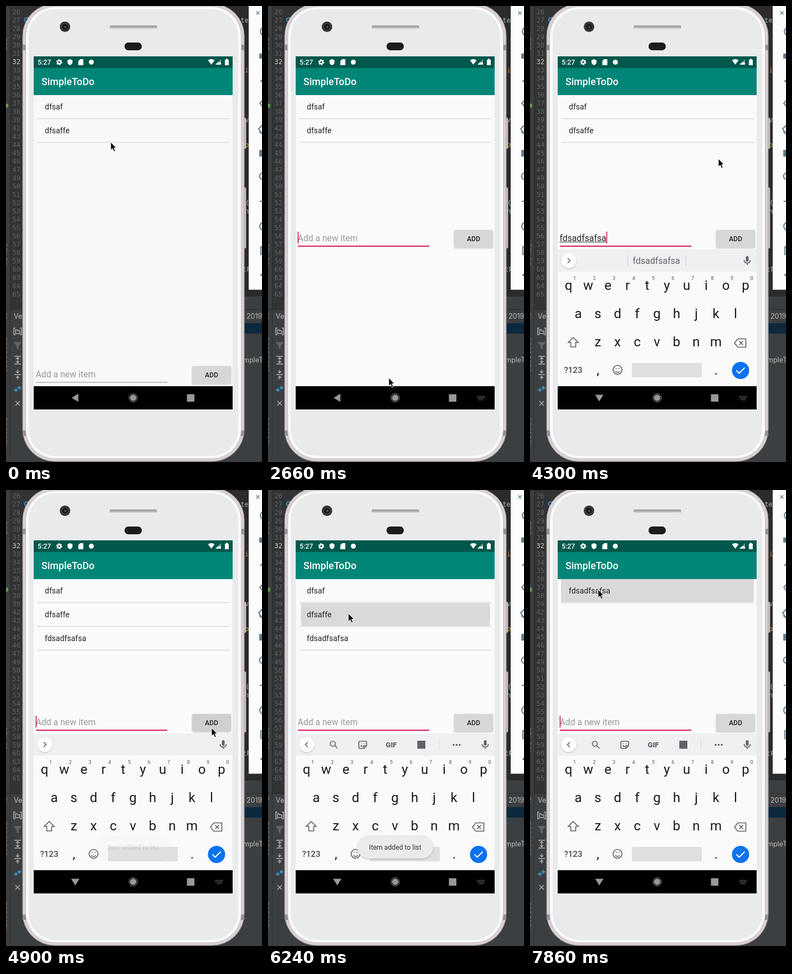
An HTML page for the animation above (8 s loop, 462 by 824 pixels).

```html
<!DOCTYPE html>
<html lang="en">
<head>
<meta charset="utf-8">
<title>To-do list demo</title>
<style>
html, body { margin: 0; width: 100%; height: 100%; overflow: hidden; background: #2b2b2b; }
svg { display: block; width: 462px; height: 824px; }
text { font-family: Roboto, sans-serif; white-space: pre; }
.ide text { font-family: Inter, sans-serif; font-size: 12.5px; fill: #bbb; }
.ide .mono { font-family: "DejaVu Sans Mono", monospace; font-size: 12px; fill: #a9b7c6; }
.ide .num { fill: #606366; text-anchor: end; }
.medium { font-weight: 500; }
.mid { text-anchor: middle; }
.item { font-size: 14px; fill: #222; }
.line { fill: none; stroke: #5f6368; stroke-width: 1.7; }
.key { font-size: 24px; fill: #17191c; text-anchor: middle; }
.hint { font-size: 9px; fill: #555; text-anchor: middle; }
.suggestion { font-size: 16px; fill: #5f6368; text-anchor: middle; }
</style>
</head>
<body>
<svg viewBox="0 0 462 824">
  <defs>
    <filter id="soft" x="-20%" y="-30%" width="140%" height="170%">
      <feDropShadow dx="0" dy="1" stdDeviation="1" flood-opacity=".28"/>
    </filter>
    <clipPath id="rowClip"><rect id="rowBox" x="56" y="161" width="348" height="42.5"/></clipPath>
  </defs>

  <g class="ide">
    <rect width="462" height="824" fill="#2b2b2b"/>
    <rect width="60" height="548" fill="#313335"/>
    <rect y="548" width="462" height="276" fill="#3c3f41"/>
    <rect x="425" y="525" width="37" height="23" fill="#3c3f41"/>
    <rect width="7" height="824" fill="#3c3f41"/>
    <path d="M7.5 0V824M0 548.5H40M425 548.5H462" stroke="#2b2b2b"/>
    <path d="M1 58v22M1 430v18M1 456v12M1 555v10M1 600v60M1 745v50" stroke="#8b8d8f" stroke-dasharray="5 3"/>
    <circle cx="0" cy="180" r="4" fill="#62a34a"/>
    <circle cx="37" cy="25" r="3.5" fill="none" stroke="#3592c4" stroke-width="2"/>
    <path d="M40 20v5" stroke="#db5860" stroke-width="2"/>
    <g id="numbers"></g>
    <text x="14" y="565">Ve</text>
    <g fill="none" stroke="#afb1b3" stroke-width="1.4">
      <path d="M17 582h-3v12h3M25 582h3v12h-3M17 592v-7h3l1 2h4v5z"/>
      <path d="M15 608h12l-5 6v6l-2-2v-4z" fill="#626567" stroke="#626567"/>
      <path d="M15 633h12M15 647h12M21 635v10M18 638l3-3 3 3M18 642l3 3 3-3"/>
      <path d="M15 666h12M21 657v6M21 675v-6M18 660l3 3 3-3M18 672l3-3 3 3"/>
      <path d="M14 694h6M17 691l3 3-3 3M28 690h-6M25 687l-3 3 3 3" stroke="#3592c4" stroke-width="2"/>
      <path d="M17 714l8 8M25 714l-8 8"/>
    </g>
    <rect x="425" y="573" width="37" height="19" fill="#0d293e"/>
    <text x="434" y="565">2019</text>
    <text x="428" y="644">mpleT</text>
    <text class="mono" x="416" y="30">ate</text>
    <text class="mono" x="431" y="120" style="fill:#cc7832">i</text>
    <text class="mono" x="431" y="210">v</text>
    <text class="mono" x="431" y="255" style="fill:#bbb529">o</text>
    <text class="mono" x="432" y="360">(</text>
    <text class="mono" x="431" y="375">n</text>
    <text class="mono" x="427" y="480">tF</text>
  </g>

  <!-- phone body -->
  <rect x="427" y="202" width="6" height="56" rx="2" fill="#d8d0d2" stroke="#948c8e"/>
  <rect x="427" y="328" width="6" height="110" rx="2" fill="#d8d0d2" stroke="#948c8e"/>
  <rect x="30" y="-4" width="400" height="827" rx="58" fill="#d8d0d3" stroke="#9d9396"/>
  <path d="M30 70h7v10h-7zM423 70h7v10h-7zM30 767h7v10h-7zM423 767h7v10h-7z" fill="#969092"/>
  <rect x="35.5" y="1" width="389" height="817" rx="53" fill="#fbfafa" stroke="#c5bec0"/>
  <rect x="41" y="6" width="378" height="807" rx="48" fill="#e8eaeb"/>
  <circle cx="106.5" cy="37.5" r="9.5" fill="#363739"/>
  <circle cx="106.5" cy="37.5" r="5" fill="#15171a"/>
  <circle cx="107" cy="38" r="2" fill="#4c545c"/>
  <rect x="187" y="35" width="86" height="6" rx="3" fill="#a5a7a9"/>
  <rect x="187" y="39" width="86" height="2" rx="1" fill="#c9cbcc"/>
  <rect x="214" y="66" width="31" height="14" rx="6.5" fill="#1b1c1e"/>

  <!-- emulator toolbar -->
  <rect x="438" width="24" height="513" fill="#fcfcfc"/>
  <path d="M438 512.5h24" stroke="#bbb"/>
  <g fill="none" stroke="#607d8b" stroke-width="2">
    <path d="M451.5 9.5l6 6m0-6l-6 6" stroke-width="1.3"/>
    <path d="M466 39a7 7 0 1 0 0 14M459 137l5-5M464 169l-6 7 6 7M464 214l-8 8 6 9M457 227l5 4M466 302a6 6 0 1 0 0 11M458 353h6M465 391a7 7 0 0 0 0 14M465 435h-5v14h5"/>
    <path d="M457 86h5v9h-5zM457 260h5v12h-5z" fill="#607d8b" stroke="none"/>
    <circle cx="461" cy="486" r="1"/>
  </g>

  <!-- app -->
  <rect id="page" x="50" y="91" width="359" height="638"/>
  <rect x="50" y="91" width="359" height="21" fill="#00574b"/>
  <rect x="50" y="112" width="359" height="49" fill="#008577"/>
  <text class="medium" x="57" y="106" font-size="12.3" fill="#fff">5:27</text>
  <g fill="#fff">
    <circle cx="96" cy="101.5" r="3" fill="none" stroke="#fff" stroke-width="2.4"/>
    <circle cx="96" cy="101.5" r="4.7" fill="none" stroke="#fff" stroke-width="1.6" stroke-dasharray="2.4 2.52"/>
    <path d="M115.5 96l4.5 2v3.5q0 3.5-4.5 5.5-4.5-2-4.5-5.5V98z"/>
    <path d="M134 96h5.5v11H130.5V99.5z"/>
    <circle cx="154" cy="101.5" r="4.5"/>
    <path d="M364.5 98q6-4 12 0l-6 8z"/>
    <path d="M388 96v10H378z" opacity=".45"/><path d="M388 102v4H378l4-4z"/>
    <path d="M395 97h2v-1.5h3V97h2v10h-7z"/>
  </g>
  <text class="medium" x="64" y="143" font-size="17.8" fill="#fff">SimpleToDo</text>
  <g id="rows"></g>

  <g id="entry">
    <path id="underline" d="M54 680H291"/>
    <text id="field" x="53.5" y="670.5" font-size="15.75"></text>
    <path id="composing" stroke="#333"/>
    <rect id="caret" y="654" width="1.7" height="21" fill="#d81b60"/>
    <rect id="button" x="336" y="650.5" width="70" height="32" rx="2" filter="url(#soft)"/>
    <text class="medium mid" x="371" y="671" font-size="12.2" fill="#222">ADD</text>
  </g>

  <g id="keyboard">
    <rect x="50" y="440" width="359" height="247" fill="#fafafa"/>
    <rect x="50" y="440" width="359" height="40" fill="#eff0f2"/>
    <circle cx="70" cy="460" r="13.5" fill="#fff" filter="url(#soft)"/>
    <path id="chevron" class="line" d="M68 455.5l4.5 4.5-4.5 4.5"/>
    <g id="tools">
      <circle class="line" cx="117" cy="458.5" r="4.5"/><path class="line" d="M120.5 462l5 5"/>
      <path class="line" d="M166 454h10q2 0 2 2v6l-5 5h-7q-2 0-2-2v-9q0-2 2-2zM178 462h-5v5M167.5 461q1.5 3 4 2.5M168 458h1M173 458h1"/>
      <text class="mid" x="222.5" y="464.5" font-size="13" font-weight="900" fill="#5f6368">GIF</text>
      <rect x="269.5" y="453" width="14.5" height="14.5" fill="#5f6368"/>
      <path d="M308.5 450v20" stroke="#d5d7d9"/>
      <path d="M335 460.5h12" stroke="#5f6368" stroke-width="3.6" stroke-linecap="round" stroke-dasharray="0 5.5"/>
    </g>
    <g id="suggestions">
      <path d="M176.5 450v21M281.5 450v21" stroke="#d0d2d4"/>
      <text class="suggestion" x="129" y="466"></text>
      <text class="suggestion" x="228" y="466"></text>
      <text class="suggestion" x="327" y="466"></text>
    </g>
    <rect x="389.5" y="452" width="5" height="10" rx="2.5" fill="#5f6368"/>
    <path class="line" d="M386.5 459q0 5.5 5.5 5.5t5.5-5.5M392 464v4"/>
    <g id="keys"></g>
    <path class="line" d="M78 599l9 9h-4.5v8h-9v-8H69z"/>
    <path class="line" d="M375 601.5h14.5v15H375l-6-7.5zM377.5 605.5l7 7m0-7l-7 7"/>
    <text class="medium mid" x="78" y="663" font-size="15" fill="#45484c">?123</text>
    <circle class="line" cx="158" cy="657.5" r="8"/>
    <path class="line" d="M154 660q4 4.5 8 0M154.5 655h2M159.5 655h2"/>
    <rect x="184" y="645" width="126" height="26" rx="2" fill="#dfdfdf"/>
    <circle cx="380" cy="658.5" r="15.5" fill="#0b72f0"/>
    <path d="M372.5 658.5l5 5 10-10" fill="none" stroke="#fff" stroke-width="2"/>
  </g>

  <g id="toast">
    <rect x="161" y="624" width="137" height="42" rx="21" fill="#ebebeb" filter="url(#soft)"/>
    <text class="mid" x="229.5" y="650" font-size="12.2" fill="#333">Item added to list</text>
  </g>

  <rect x="50" y="687" width="359" height="42"/>
  <path id="back" d="M118.5 708l12-7.5v15z" fill="#999"/>
  <circle cx="229.5" cy="708" r="5.8" fill="#999"/>
  <circle cx="229.5" cy="708" r="7.5" fill="none" stroke="#999"/>
  <rect x="326.5" y="701.5" width="13.5" height="13.5" rx="1" fill="#999"/>
  <path id="imeIcon" d="M378 705.5h14M378 708.5h14M381 711.5h8" stroke="#888" stroke-width="1.6" stroke-dasharray="1.6 1.2"/>
  <path id="mouse" d="M0 0V14.5L3.3 11.5 5.8 17 8.2 16 5.8 10.5H10z" fill="#000" stroke="#fff" stroke-width=".9"/>
</svg>

<script>
const $ = id => document.getElementById(id);
const LOOP = 8000;
const RIPPLE_FULL = 180;

// Each track holds [start, value...]; a value stays until the next start.
const mouseTrack = [
  [0, 189, 246], [300, 150, 200], [440, 117, 166], [740, 101, 170], [890, 200, 215],
  [1030, 310, 240], [1180, 350, 330], [1320, 345, 480], [1470, 310, 590], [1620, 225, 672],
  [2370, 218, 672], [4010, 250, 540], [4150, 300, 380], [4300, 340, 276], [4600, 362, 390],
  [4750, 371, 430], [5200, 350, 370], [5350, 300, 300], [5500, 240, 262], [5650, 190, 240],
  [5800, 152, 227], [5950, 145, 223], [6830, 140, 205], [6970, 130, 188], [7120, 123, 180]
];
const typedTrack = [[0, ""], [3560, "fds"], [3710, "fdsad"], [3860, "fdsadfs"],
  [4010, "fdsadfsaf"], [4150, "fdsadfsafsa"], [4900, ""]];
const listTrack = [[0, "dfsaf", "dfsaffe"], [4900, "dfsaf", "dfsaffe", "fdsadfsafsa"],
  [6530, "dfsaf", "fdsadfsafsa"], [7860, "fdsadfsafsa"]];
const caretTrack = [[0, 0], [2370, 1], [3110, 0], [3560, 1], [5350, 0], [5800, 1],
  [6240, 0], [6680, 1], [7270, 0], [7720, 1]];
const stripTrack = [[0, "tools"], [3560, "words"], [4900, "plain"], [5200, "tools"]];
const toastTrack = [[0, 0], [4900, .15], [5050, .8], [5200, 1], [6830, .7], [6970, .2], [7120, 0]];
// row, ripple radius, opacity
const rippleTrack = [[0, 0, 0, 0], [6240, 1, 171, 1], [6380, 1, RIPPLE_FULL, 1], [6680, 1, RIPPLE_FULL, .4],
  [6830, 1, 0, 0], [7570, 0, 100, .7], [7720, 0, 171, 1], [7860, 0, RIPPLE_FULL, 1]];

const at = (track, t) => track.findLast(step => step[0] <= t).slice(1);
const show = (id, visible) => $(id).setAttribute("visibility", visible ? "inherit" : "hidden");
const set = (id, attributes) => {
  for (const name in attributes) $(id).setAttribute(name, attributes[name]);
};
const label = (cls, x, y, text) => `<text class="${cls}" x="${x}" y="${y}">${text}</text>`;

function buildStatic() {
  const folded = [40, 41, 48, 61, 62];
  const numbers = Array.from({ length: 40 }, (_, i) => i + 26).filter(n => !folded.includes(n));
  $("numbers").innerHTML = numbers.map((n, i) =>
    `<text class="mono num" x="26" y="${15 + 15 * i}"${n === 32 ? ' style="fill:#ccc"' : ""}>${n}</text>`).join("");

  const keyRow = (letters, x, y) => [...letters].map((c, i) => label("key", x + 35.5 * i, y, c)).join("");
  $("keys").innerHTML = keyRow("qwertyuiop", 69.5, 513) + keyRow("asdfghjkl", 87, 564) +
    keyRow("zxcvbnm", 122.5, 615) + label("key", 122.5, 666, ",") + label("key", 336, 666, ".") +
    [..."1234567890"].map((c, i) => label("hint", 80.5 + 35.5 * i, 495, c)).join("");

  $("rows").innerHTML = `<circle id="ripple" cx="230" fill="#d9d9d9" clip-path="url(#rowClip)"/>` +
    [0, 1, 2].map(i => `<g id="row${i}"><path d="M56 ${203.5 + 43 * i}H404" stroke="#e2e2e2" stroke-width="2"/>` +
      label("item", 70, 187 + 43 * i, "") + "</g>").join("");
}

function drawList(t) {
  const items = at(listTrack, t);
  for (let i = 0; i < 3; i++) {
    show("row" + i, i < items.length);
    $("row" + i).querySelector("text").textContent = items[i] || "";
  }
  const [row, r, opacity] = at(rippleTrack, t);
  set("rowBox", { y: 161 + 43 * row });
  set("ripple", { cy: 182 + 43 * row, r, opacity });
}

function drawEntry(t) {
  const typed = at(typedTrack, t)[0];
  const focused = t >= 2370;
  set("entry", { transform: `translate(0 ${t >= 2520 ? -246 : 0})` });
  set("underline", { stroke: focused ? "#d81b60" : "#858585", "stroke-width": focused ? 2 : 1 });
  $("field").textContent = typed || "Add a new item";
  set("field", { fill: typed ? "#222" : "#999" });
  const end = 53.5 + (typed ? $("field").getComputedTextLength() : 0);
  set("composing", { d: typed ? `M53.5 672.5H${end}` : "" });
  set("caret", { x: end });
  show("caret", at(caretTrack, t)[0]);
  set("button", { fill: t >= 4750 && t < 5050 ? "#cecfcf" : "#d6d7d7" });
}

function drawKeyboard(t) {
  const open = t >= 2810;
  const strip = at(stripTrack, t)[0];
  const typed = at(typedTrack, t)[0];
  show("keyboard", open);
  show("tools", strip === "tools");
  show("suggestions", strip === "words");
  set("chevron", { transform: strip === "tools" ? "rotate(180 70 460)" : "" });
  const words = typed === "fds" ? ["fds", "FD", "fast"] : ["", typed, ""];
  $("suggestions").querySelectorAll("text").forEach((el, i) => el.textContent = words[i]);
  set("back", { transform: open ? "rotate(-90 125 708)" : "" });
  show("imeIcon", t >= 2520);
}

function draw(t) {
  set("page", { fill: t < 2370 ? "#f8f8f8" : "#fafafa" });
  drawList(t);
  drawEntry(t);
  drawKeyboard(t);
  set("toast", { opacity: at(toastTrack, t)[0] });
  set("mouse", { transform: `translate(${at(mouseTrack, t)})` });
}

buildStatic();
const start = performance.now();
function tick() {
  draw((performance.now() - start) % LOOP);
  requestAnimationFrame(tick);
}
tick();
</script>
</body>
</html>
```
